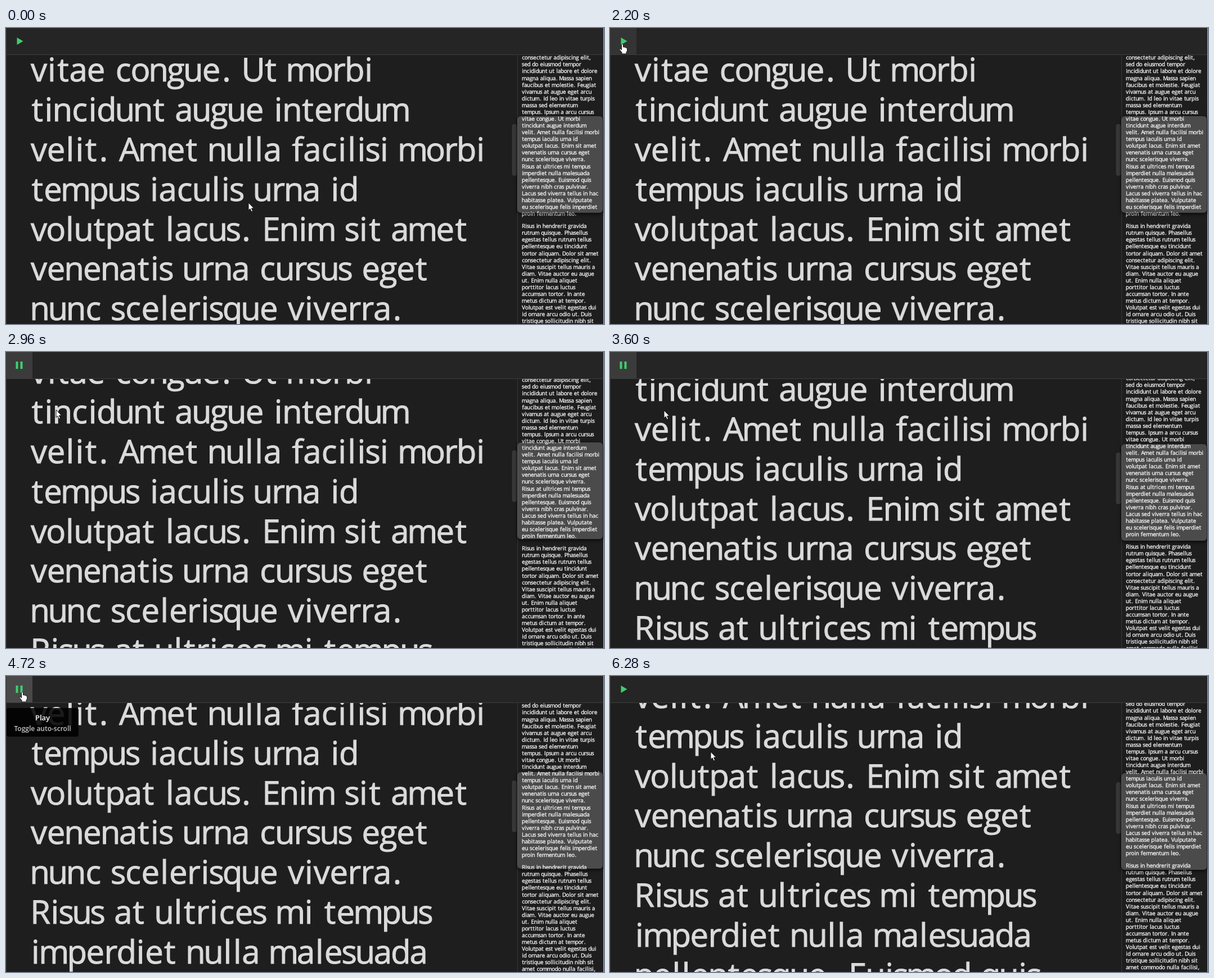
An HTML page that plays this animation: 1063 px wide and 527 px high, repeating every 7000 ms.

```html
<!DOCTYPE html>
<html lang="la">
<head>
<meta charset="utf-8">
<title>Auto-scroll</title>
<style>
html, body { margin: 0; width: 100%; height: 100%; overflow: hidden; background: #1e1e1e; }
body > * { position: absolute; box-sizing: border-box; }
svg { display: block; }
#stage, #pointer { left: 0; top: 0; }
#copy { font: 58px "Open Sans", "Noto Sans", sans-serif; text-anchor: middle; text-rendering: geometricPrecision;
  fill: currentColor; stroke: currentColor; }
#page { color: #dadada; stroke-width: 1; }
#map { color: #f4f4f4; stroke-width: 2; }
#lens { left: 909px; top: 157px; width: 152px; height: 172px; border-radius: 6px;
  background: rgba(255,255,255,.2); box-shadow: 0 2px 6px rgba(0,0,0,.75); }
#tip { left: 1px; top: 57px; width: 128px; height: 51px; border-radius: 4px; background: rgba(0,0,0,.88);
  color: #c4c4c4; font: 600 12px/20px "Open Sans", "Noto Sans", sans-serif; text-align: center; padding-top: 7px; white-space: nowrap; }
#tip b { display: block; color: #fff; font-size: 13px; font-weight: 600; }
</style>
</head>
<body>
<svg id="stage" width="1063" height="527">
  <defs><g id="copy"></g></defs>
  <rect width="1063" height="47" fill="#252526"/>
  <rect id="button" x="1" width="46" height="47" fill="#fff"/>
  <path id="icon" fill="#3fcf6b"/>
  <rect y="47" width="1061" height="1" fill="#3c3c3c"/>
  <rect width="1" height="527" fill="#333"/>
  <svg x="1" y="48" width="908" height="479"><use id="page" href="#copy"/></svg>
  <rect id="thumb" x="899.5" width="8.5" height="92" rx="4" fill="#383838"/>
  <rect x="909" y="48" width="1" height="479" fill="#383838"/>
  <svg x="910" y="48" width="151" height="479"><use id="map" href="#copy"/></svg>
  <rect x="1061" width="1" height="527" fill="#3a3620"/>
  <rect x="1062" width="1" height="527" fill="#d8b820"/>
</svg>
<div id="lens"></div>
<div id="tip"><b>Play</b>Toggle auto-scroll</div>
<svg id="pointer" width="1063" height="527">
  <g id="cursor" fill="#fff" stroke="#111" stroke-linejoin="round">
    <path id="arrow" d="M0 0V13.5L3 10.8 5.2 16 7.6 15 5.4 10H9.6Z"/>
    <path id="hand" d="M-1.5 1.5Q0-1 1.5 1.5V6Q3 5 4.3 6.6 5.6 5.8 6.6 7.3 8.6 7 8.6 9V12.5L7 15.5V18H-1V15.5L-5 10.5Q-5.2 8-3.2 9L-1.5 11Z"/>
  </g>
</svg>
<script>
const TEXT = `consectetur adipiscing elit,
sed do eiusmod tempor
incididunt ut labore et dolore
magna aliqua. Massa sapien
faucibus et molestie. Feugiat
vivamus at augue eget arcu
dictum. Id leo in vitae turpis
massa sed elementum
tempus. Ipsum a arcu cursus
vitae congue. Ut morbi
tincidunt augue interdum
velit. Amet nulla facilisi morbi
tempus iaculis urna id
volutpat lacus. Enim sit amet
venenatis urna cursus eget
nunc scelerisque viverra.
Risus at ultrices mi tempus
imperdiet nulla malesuada
pellentesque. Euismod quis
viverra nibh cras pulvinar.
Lacus sed viverra tellus in hac
habitasse platea. Vulputate
eu scelerisque felis imperdiet
proin fermentum leo.

Risus in hendrerit gravida
rutrum quisque. Phasellus
egestas tellus rutrum tellus
pellentesque eu tincidunt
tortor aliquam. Dolor sit amet
consectetur adipiscing elit.
Vitae suscipit tellus mauris a
diam. Vitae auctor eu augue
ut. Enim nulla aliquet
porttitor lacus luctus
accumsan tortor. In ante
metus dictum at tempor.
Volutpat est velit egestas dui
id ornare arcu odio ut. Duis
tristique sollicitudin nibh sit
amet commodo nulla facilisi,`;
const EM = 59, LEADING = 70.8, MAP_SCALE = 0.1706, LOOP = 7000;

// Letter pitch in thousandths of an em, grouped by equal value
const PITCH = {};
Object.entries({
  a: 525, bdpqP: 557, c: 495, e: 545, f: 370, g: 502, hnu: 546, i: 285, l: 295, m: 830,
  o: 537, r: 389, s: 405, t: 396, v: 490, ' ': 301, '.,': 367,
  AV: 590, D: 613, E: 536, F: 525, I: 278, L: 507, M: 709, R: 582, U: 648
}).forEach(([chars, w]) => [...chars].forEach(c => PITCH[c] = w * EM / 1000));

const $ = id => document.getElementById(id);
let y = 0;
for (const line of TEXT.split('\n')) {
  if (!line) { y += EM; continue; }
  const text = document.createElementNS('http://www.w3.org/2000/svg', 'text');
  let x = 0;
  text.setAttribute('x', [...line].map(c => {
    const mid = x + PITCH[c] / 2;
    x += PITCH[c];
    return mid.toFixed(2);
  }).join(' '));
  text.setAttribute('y', y);
  text.textContent = line;
  $('copy').append(text);
  y += LEADING;
}

// Pointer stops: time, x, y
const STOPS = [
  [0, 431, 311], [120, 431, 311], [200, 428, 307], [520, 428, 307], [1200, 22, 28], [2400, 22, 28],
  [2960, 89, 103], [3200, 96, 104], [3600, 96, 104], [4120, 89, 96], [4480, 29, 24],
  [4720, 29, 28], [5680, 29, 28], [6280, 179, 135], [LOOP, 179, 135]
];
const PLAY = 'M19.5 17 30.5 23.5 19.5 30Z', PAUSE = 'M17.5 17h4v13h-4ZM25.5 17h4v13h-4Z';
const ramp = (t, a, b) => Math.min(1, Math.max(0, (t - a) / (b - a)));

function pointerAt(t) {
  const i = STOPS.findIndex(s => s[0] > t);
  const [a, ax, ay] = STOPS[i - 1], [b, bx, by] = STOPS[i];
  const u = ramp(t, a, b), e = u * u * (3 - 2 * u);
  return [Math.round(ax + (bx - ax) * e), Math.round(ay + (by - ay) * e)];
}

function tipOpacity(t) {
  if (t < 2200) return ramp(t, 1200, 1480);
  return t < 5200 ? ramp(t, 4520, 4720) : 0;
}

function draw(now) {
  const t = Math.floor(now % LOOP / 40) * 40;
  const playing = t >= 2400 && t < 5200;
  const scroll = t < 2400 ? 0 : Math.round((Math.min(t, 5200) - 2341) * 0.063);

  $('page').setAttribute('transform', `translate(43 ${47.5 - 9 * LEADING - scroll})`);
  const mapY = Math.round(117 - 0.081 * scroll) - 9 * LEADING * MAP_SCALE;
  $('map').setAttribute('transform', `translate(7.1 ${mapY}) scale(${MAP_SCALE})`);
  $('lens').style.top = Math.round(157 + 0.09 * scroll) + 'px';
  $('thumb').setAttribute('y', Math.round(171 + 0.1 * scroll));

  const [px, py] = pointerAt(t), hover = px < 47 && py < 47;
  $('cursor').setAttribute('transform', `translate(${px} ${py})`);
  $('arrow').style.display = hover ? 'none' : '';
  $('hand').style.display = hover ? '' : 'none';
  $('button').setAttribute('opacity', (hover ? 0.065 : 0) + (playing ? 0.1 : 0));
  $('icon').setAttribute('d', playing ? PAUSE : PLAY);

  const shown = tipOpacity(t);
  $('tip').style.opacity = shown;
  $('tip').style.transform = `scale(${1.1 - 0.1 * shown})`;
}

const start = performance.now();
(function tick() {
  draw(performance.now() - start);
  requestAnimationFrame(tick);
})();
</script>
</body>
</html>
```
